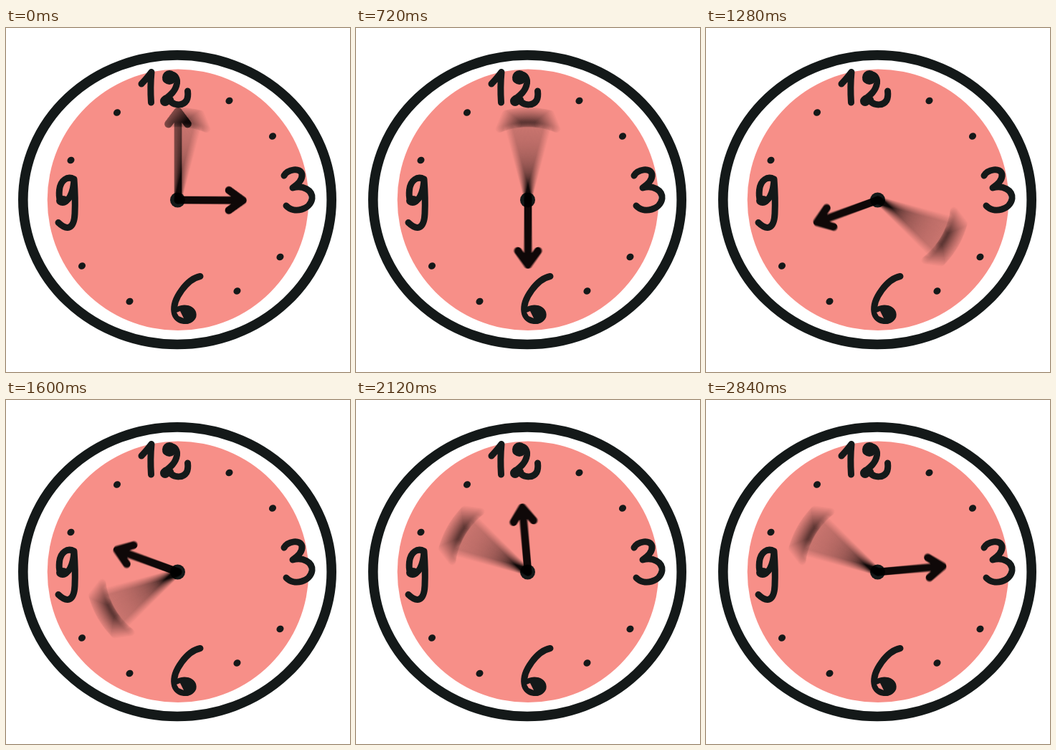
Recreate the animation shown at these times as an HTML page with a canvas. Size 480 by 480 pixels, loop 2880 ms.

```html
<!DOCTYPE html>
<html lang="en">
<head>
<meta charset="utf-8">
<title>Clock</title>
<style>
  html, body { margin: 0; width: 100%; height: 100%; overflow: hidden; background: #fff; }
  svg, canvas { position: absolute; left: 0; top: 0; width: 480px; height: 480px; display: block; }
  .ink { fill: none; stroke: #141919; stroke-width: 9; stroke-linecap: round; stroke-linejoin: round; }
  .dot { fill: #141919; }
</style>
</head>
<body>
<svg viewBox="0 0 480 480">
  <ellipse cx="239" cy="239.7" rx="215.2" ry="201.8" fill="#fff" stroke="#141919" stroke-width="13.6"/>
  <circle cx="240" cy="239.8" r="182.3" fill="#f78f88"/>
  <g class="ink">
    <path d="M189 78 Q196 71 203 61.5 Q201 82 202.5 104"/>
    <path d="M223 72 C225 61 240 63 238.5 77 C237 88 229 94 220 101 C224 95 231 98 230 103 C236 108 247 109 252 101 Q254.500 96 253.500 88"/>
    <path d="M388 206 C393 197 411 194 413 204 C414 213 406 219 400 223 C414 219 428 226 427 238 C425 253 402 260 391 248"/>
    <path d="M95 211 C86 206 76 212 74.500 226 C73.500 236 75 242 79 243 C87 243 94 231 95 211 Q97 238 96 259 C95 281 85 283 73 271.500"/>
    <path d="M271 346.500 C253 350 232 378 235 396 C237 411 257 412 261 402 C263 391 247 387 236 396"/>
  </g>
  <g class="dot">
    <circle cx="228" cy="69" r="10"/>
    <circle cx="222" cy="102" r="7"/>
    <ellipse cx="79" cy="241" rx="9" ry="7"/>
    <circle cx="251" cy="400" r="13"/>
  </g>
  <path d="M238 397 L243 395 L248 405 L241 402 Z" fill="#f78f88"/>
  <g class="dot" id="dots"></g>
  <circle class="dot" cx="239.500" cy="240" r="10.5"/>
</svg>
<canvas id="hands" width="480" height="480"></canvas>
<script>
const LOOP = 2880, STEP = 40, SAMPLES = 40, SHUTTER = 0.5;

const dots = [[311.5, 101.5], [372, 151], [382.5, 319.5], [322.5, 367],
              [172.5, 381.5], [106, 332], [90.5, 184.5], [155, 118]];
for (const [x, y] of dots) {
  const dot = document.createElementNS('http://www.w3.org/2000/svg', 'ellipse');
  const size = { cx: x, cy: y, rx: 5.2, ry: 4.7, transform: `rotate(-35 ${x} ${y})` };
  for (const key in size) dot.setAttribute(key, size[key]);
  document.getElementById('dots').append(dot);
}

const arrow = (tip, barb, half) =>
  new Path2D(`M0 0V${-tip}M${-half} ${-barb}L0 ${-tip}L${half} ${-barb}`);

const hands = [
  { path: arrow(124, 106, 13.5), width: 10.5, start: 0, turn: 60 },
  { path: arrow(90.5, 71, 14), width: 10.5, start: 90, turn: 5 }
];

const view = document.getElementById('hands').getContext('2d');
const layer = document.createElement('canvas');
layer.width = layer.height = 480;
const ink = layer.getContext('2d');
ink.lineCap = ink.lineJoin = 'round';

// Average the hand over the open shutter to get its motion blur.
function drawHand(hand, step) {
  ink.setTransform(1, 0, 0, 1, 0, 0);
  ink.clearRect(0, 0, 480, 480);
  ink.globalCompositeOperation = 'lighter';
  ink.globalAlpha = 1 / SAMPLES;
  ink.lineWidth = hand.width;
  for (let i = 0; i < SAMPLES; i++) {
    const offset = ((i + 0.5) / SAMPLES - 0.5) * SHUTTER;
    const moment = Math.max(0, step + offset);
    const angle = (hand.start + hand.turn * moment) * Math.PI / 180;
    ink.setTransform(1, 0, 0, 1, 240, 240);
    ink.rotate(angle);
    ink.stroke(hand.path);
  }
  view.drawImage(layer, 0, 0);
}

let shown = -1;
function render(time) {
  const step = Math.floor((time % LOOP) / STEP);
  if (step === shown) return;
  shown = step;
  view.clearRect(0, 0, 480, 480);
  for (const hand of hands) drawHand(hand, step);
}

let begin;
function tick(now) {
  begin ??= now;
  render(Math.max(0, now - begin));
  requestAnimationFrame(tick);
}
render(0);
requestAnimationFrame(tick);
</script>
</body>
</html>
```
